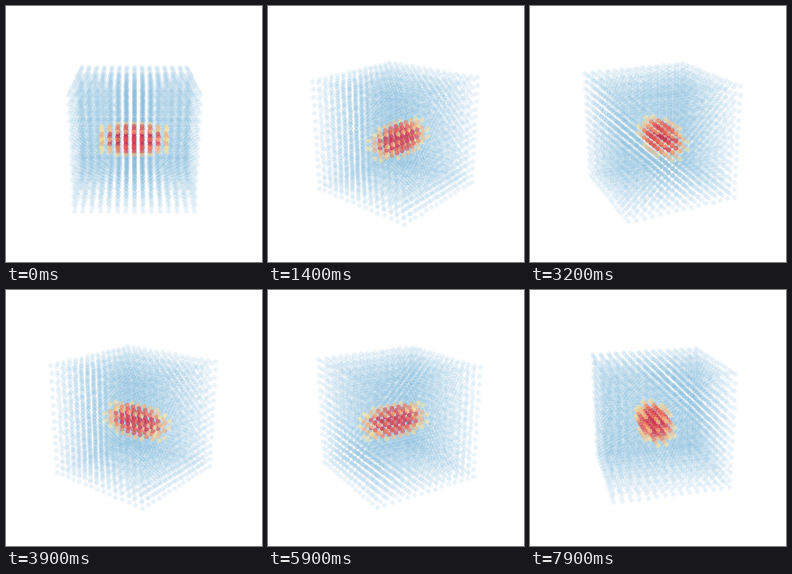
Write a matplotlib script that moves like this. It is 256x256 px and loops after 8000 ms.

```python
import numpy as np
import matplotlib.pyplot as plt
from matplotlib.animation import FuncAnimation
from matplotlib.colors import LinearSegmentedColormap

SIZE = 256
FRAMES = 80
STEP = np.radians(3.6)      # turn per frame
ELEV = np.radians(20)
DIST, FOCAL = 8.56, 480     # camera distance in half cubes, focal length in pixels
N = 15
DOT = (4.7 * 0.72) ** 2

HEAT = LinearSegmentedColormap.from_list(
    "heat", ["#cc2848", "#d83a4c", "#f06a48", "#fab070", "#fbe08c"])

# axes: front (towards the viewer at the start), right, up; in grid steps
steps = np.arange(N) - N // 2
grid = np.stack(np.meshgrid(steps, steps, steps), -1).reshape(-1, 3).astype(float)
core_dist = np.sqrt((((grid - [0.5, 0, -0.5]) / [2.5, 5.2, 2.5]) ** 2).sum(1))
inside = core_dist < 1
shell = grid[~inside] * 2 / (N - 1)
core = grid[inside] * 2 / (N - 1)
level = np.clip((core_dist[inside] - 0.5) / 0.45, 0, 1)
core_rgba = HEAT(level)
core_rgba[:, 3] = 0.72 - 0.22 * level


def project(points, angle):
    """Return screen positions and depths after turning about the vertical."""
    front, right, up = points.T
    c, s = np.cos(angle), np.sin(angle)
    x = front * s + right * c
    near = front * c - right * s
    depth = DIST - near * np.cos(ELEV) - up * np.sin(ELEV)
    y = up * np.cos(ELEV) - near * np.sin(ELEV)
    half = SIZE / 2
    return np.column_stack([half + FOCAL * x / depth, half - FOCAL * y / depth]), depth


fig = plt.figure(figsize=(SIZE / 100, SIZE / 100), dpi=100, facecolor="white")
ax = fig.add_axes([0, 0, 1, 1])
ax.set(xlim=(0, SIZE), ylim=(SIZE, 0))
ax.axis("off")
shell_dots = ax.scatter(*project(shell, 0)[0].T, s=DOT, color="#5fa8d3",
                        alpha=0.13, linewidths=0)
core_dots = ax.scatter(*project(core, 0)[0].T, s=DOT, c=core_rgba, linewidths=0)


def update(i):
    angle = i * STEP
    shell_dots.set_offsets(project(shell, angle)[0])
    spots, depth = project(core, angle)
    order = np.argsort(-depth)
    core_dots.set_offsets(spots[order])
    core_dots.set_facecolors(core_rgba[order])
    return shell_dots, core_dots


anim = FuncAnimation(fig, update, frames=FRAMES, interval=100,
                     repeat=True, repeat_delay=0, blit=False)
plt.show()
```
